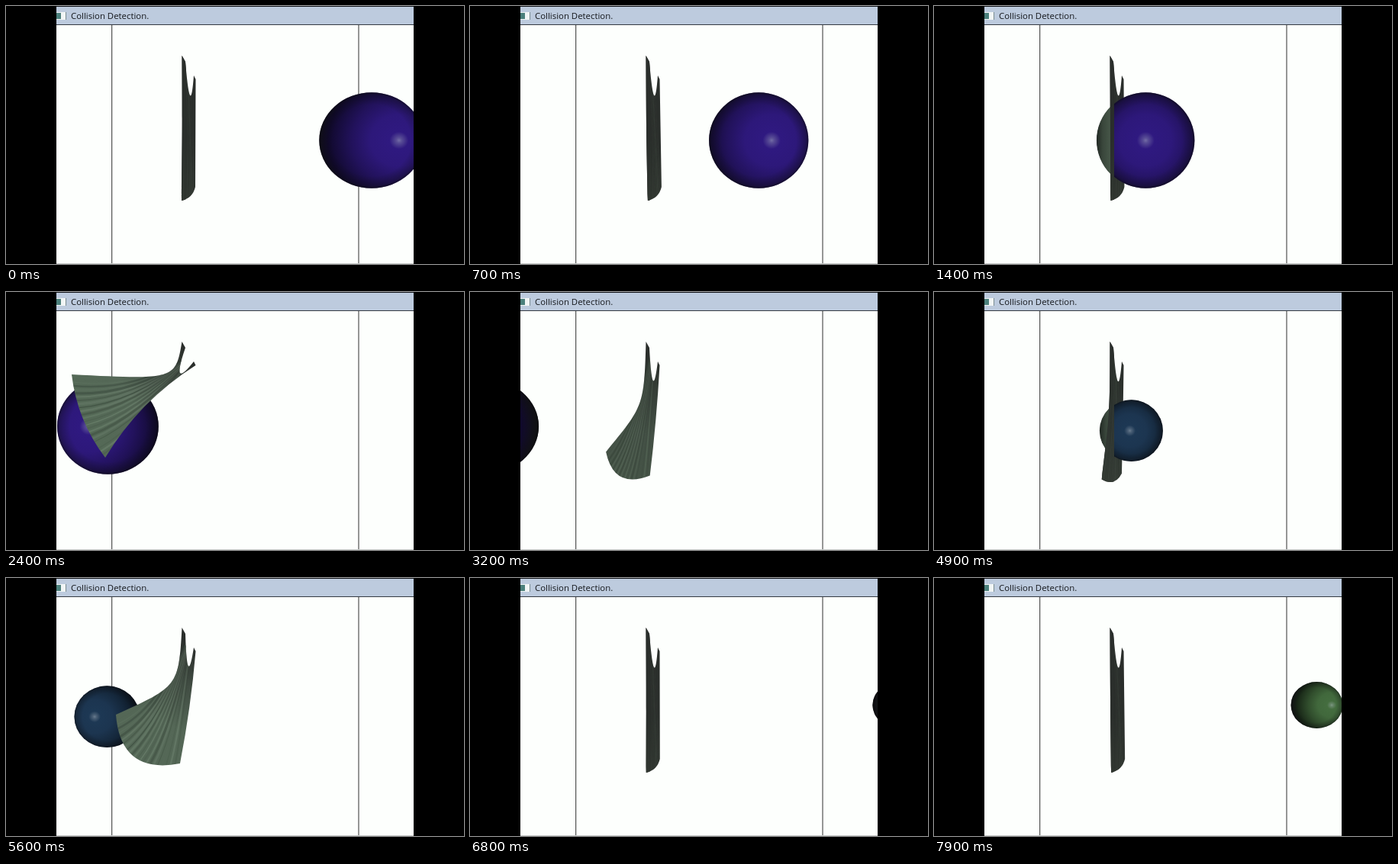
Write an HTML page with a canvas that moves like this. It is 600 by 338 pixels and loops after 8 s.

```html
<!DOCTYPE html>
<html lang="en">
<head>
<meta charset="utf-8">
<title>Collision Detection</title>
<style>
html, body { margin: 0; width: 600px; height: 338px; overflow: hidden; background: #000; }
canvas { display: block; }
#title { position: absolute; left: 85px; top: 5px; font: 11.4px/16px "Open Sans", "Noto Sans", sans-serif; color: #15181c; white-space: nowrap; }
</style>
</head>
<body>
<canvas id="stage" width="600" height="338"></canvas>
<div id="title">Collision Detection.</div>
<script>
const ctx = document.getElementById('stage').getContext('2d');
const LOOP = 8000, STEP = 100, LIGHT_X = 278;
const HANG_X = 236, LET_GO_X = 225;

// Each ball crosses at constant speed: x at time t0, px per ms.
const balls = [
  { from: 0, to: 3500, t0: 0, x: 479, v: -0.144, y: 176, r: 62.7, rgb: [45, 24, 122] },
  { from: 3500, to: 6500, t0: 4200, x: 385, v: -0.1805, y: 181.7, r: 40.4, rgb: [28, 53, 80] },
  { from: 6500, to: 8000, t0: 6800, x: 563, v: -0.056, y: 166.5, r: 30.4, rgb: [65, 104, 60] }
];

// Near corner, far corner, point the left edge bends around, bulge of the lower and right edges.
const poses = {
  rest: [248, 237, 230, 255, 231, 160, 8, 0],
  swing: [228, 243, 144, 179, 226, 142, 59, -4],
  fling: [130, 217, 86, 108, 222, 115, 16, 20]
};
const keys = [
  [0, 'rest'], [1400, 'rest'], [1900, 'swing'], [2400, 'fling'], [3000, 'swing'], [3500, 'rest'],
  [4850, 'rest'], [5250, 'swing'], [5600, 'swing'], [6500, 'rest'], [LOOP, 'rest']
];
const pinA = [230.5, 65], pinB = [246, 91], pinC = [248.5, 96];

const mix = (a, b, k) => a + (b - a) * k;
const clamp = k => Math.min(1, Math.max(0, k));
const rgb = (c, k = 1) => `rgb(${c.map(v => Math.round(v * k))})`;
const blend = (a, b, k) => rgb(a.map((v, i) => mix(v, b[i], k)));
const noise = i => Math.abs(Math.sin(i * 127.1) * 43758.5) % 1;

function clothAt(t) {
  const i = keys.findIndex((k, n) => n && t <= k[0]);
  const [ta, a] = keys[i - 1], [tb, b] = keys[i];
  const k = (t - ta) / (tb - ta);
  const [x1, y1, x2, y2, nx, ny, low, side] = poses[a].map((v, n) => mix(v, poses[b][n], k));
  const light = clamp((228 - x2) / 85);
  const sway = 3 * Math.sin(t / 530) * (1 - light);
  const lift = (248 - x1) / 118;
  return {
    near: [x1 + sway, y1], far: [x2 + sway, y2], neck: [nx, ny],
    notch: [241 - 13 * lift, 117 - 11 * lift], low, side, light
  };
}

// Control point for a curve from a to b, pushed sideways off the chord.
function bow([ax, ay], [bx, by], size) {
  const k = size / Math.hypot(bx - ax, by - ay);
  return [(ax + bx) / 2 + (by - ay) * k, (ay + by) / 2 - (bx - ax) * k];
}

function fillGradient(g, stops) {
  stops.forEach(([k, c]) => g.addColorStop(k, c));
  ctx.fillStyle = g;
  ctx.fill();
}

function shape(ball, t) {
  const x = ball.x + ball.v * (t - ball.t0), d = x - LIGHT_X;
  return { ...ball, x, d, wide: 1.02 + 0.075 * (d / 200) ** 2 };
}

function drawBall({ x, y, r, d, wide, rgb: base }) {
  const spot = d * r * 0.0026;
  ctx.save();
  ctx.translate(x, y);
  ctx.scale(wide, 1);
  ctx.beginPath();
  ctx.arc(0, 0, r, 0, 7);
  fillGradient(ctx.createRadialGradient(spot, 0, 0, spot, 0, r * 1.8), [
    [0, blend(base, [200, 210, 220], .45)], [.03, blend(base, [200, 210, 220], .28)],
    [.1, rgb(base, 1.05)], [.3, rgb(base)], [.5, rgb(base, .75)],
    [.75, rgb(base, .36)], [.9, '#131317'], [1, '#080808']
  ]);
  fillGradient(ctx.createRadialGradient(0, 0, r * .75, 0, 0, r), [
    [0, 'rgba(10,10,12,0)'], [.8, 'rgba(10,10,12,.3)'], [1, 'rgba(10,10,12,.6)']
  ]);
  ctx.restore();
}

// The sheet stretched over the side of the ball that has pushed through.
function drawCap({ x, y, r, wide }) {
  ctx.beginPath();
  ctx.ellipse(x, y, r * wide + .5, r + .5, 0, 0, 7);
  const left = x - r * wide;
  fillGradient(ctx.createLinearGradient(left, 0, left + 30, 0),
    [[0, '#232b25'], [.25, '#39463b'], [.7, '#4b5c4d'], [1, '#425144']]);
}

function drawCloth({ near, far, neck, notch, low, side, light }) {
  const base = bow(near, far, low);
  ctx.save();
  ctx.beginPath();
  ctx.moveTo(...pinA);
  ctx.lineTo(235, 73);
  ctx.quadraticCurveTo(2 * notch[0] - 240.5, 2 * notch[1] - 82, ...pinB);
  ctx.lineTo(...pinC);
  ctx.quadraticCurveTo(...bow(pinC, near, -side), ...near);
  ctx.quadraticCurveTo(...base, ...far);
  ctx.bezierCurveTo(...neck, ...neck, ...pinA);
  const dark = [42, 46, 43];
  fillGradient(ctx.createLinearGradient(240, 85, ...base), [
    [0, rgb(dark)], [.25, blend(dark, [74, 89, 76], light * .7)],
    [.55, blend(dark, [85, 104, 87], light)], [1, blend([48, 54, 48], [84, 105, 86], light)]
  ]);
  ctx.clip();

  // Folds fan out from the pinned end to the free edge.
  const folds = 24;
  for (let i = 1; i < folds; i++) {
    const k = i / folds, u = 1 - k;
    const end = [0, 1].map(n => u * u * near[n] + 2 * u * k * base[n] + k * k * far[n]);
    const alpha = (.08 + .22 * light) * noise(i);
    ctx.strokeStyle = i % 2 ? `rgba(18,27,20,${alpha})` : `rgba(165,190,165,${alpha * .7})`;
    ctx.lineWidth = 1 + light * 2.5 * noise(i + 50);
    ctx.beginPath();
    ctx.moveTo(mix(242, 233, k), 88);
    ctx.quadraticCurveTo(mix(notch[0], end[0], .45), mix(notch[1], end[1], .5) + 16 * light, ...end);
    ctx.stroke();
  }
  ctx.restore();
}

function clipTo(x, y, w, h, paint) {
  ctx.save();
  ctx.beginPath();
  ctx.rect(x, y, w, h);
  ctx.clip();
  paint();
  ctx.restore();
}

function rect(color, ...box) {
  ctx.fillStyle = color;
  ctx.fillRect(...box);
}

function drawWindow() {
  rect('#bdcbde', 66, 0, 468, 25);
  rect('#14171b', 66, 0, 468, 1);
  rect('#343a43', 66, 24, 468, 1);
  rect('#f1f5f5', 66, 8, 13, 10);
  rect('#4b807c', 66, 9, 6, 8);
  rect('#7a8d91', 78, 8, 1, 10);
}

function drawScene(t) {
  rect('#fdfffd', 66, 25, 468, 313);
  rect('#303030', 138.2, 25, 1, 313);
  rect('#303030', 461.5, 25, 1, 313);
  rect('#c9cccb', 66, 337, 468, 1);

  const ball = shape(balls.find(b => t >= b.from && t < b.to), t);
  const cloth = clothAt(t);
  const pushing = ball.x > LET_GO_X;
  if (pushing) drawCloth(cloth);
  drawBall(ball);
  clipTo(66, 25, pushing ? HANG_X - 66 : 468, 313, () => {
    if (pushing) drawCap(ball);
    drawCloth(cloth);
  });
  drawWindow();
}

const start = performance.now();
function tick() {
  const t = (performance.now() - start) % LOOP;
  rect('#000', 0, 0, 600, 338);
  clipTo(66, 0, 468, 338, () => drawScene(Math.floor(t / STEP) * STEP));
  requestAnimationFrame(tick);
}
tick();
</script>
</body>
</html>
```
